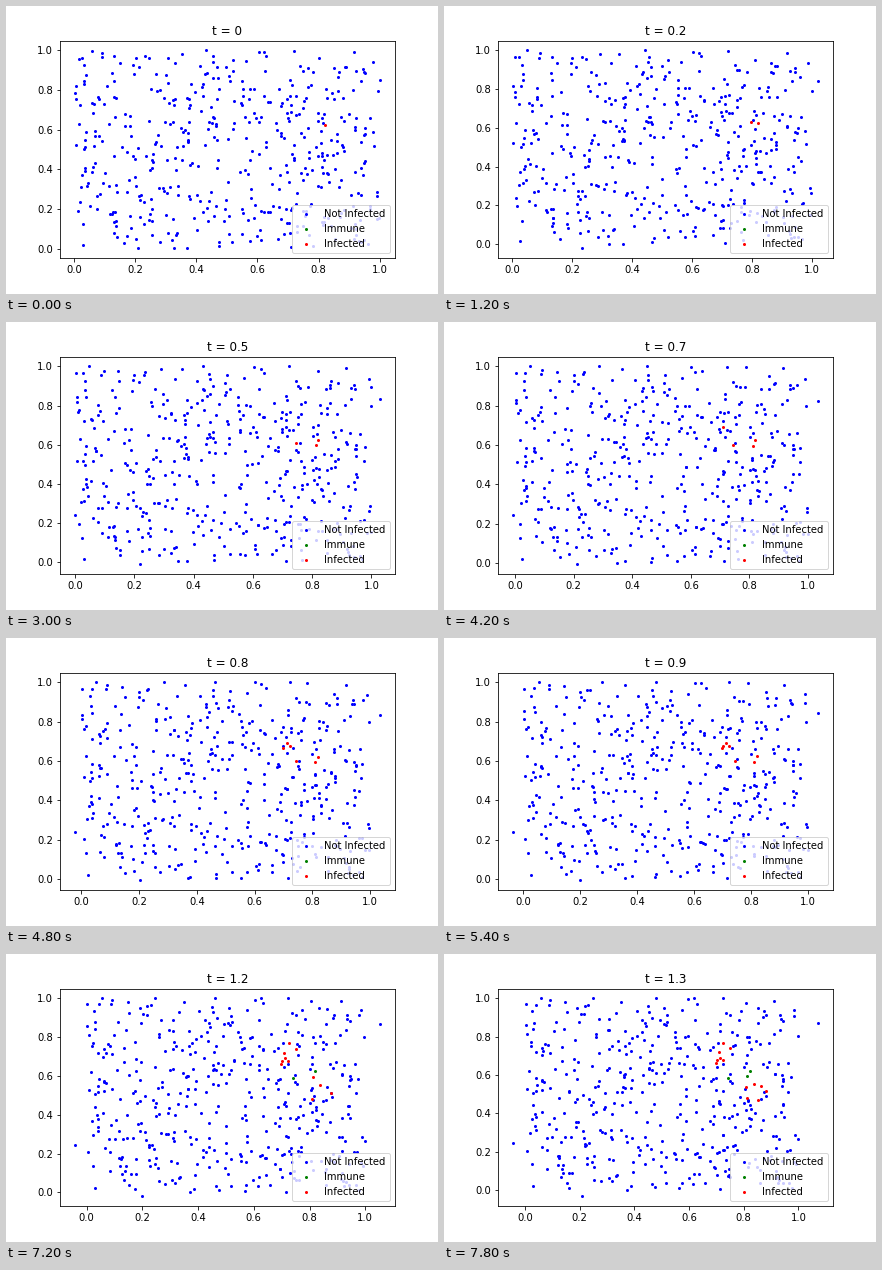
These frames come from a looping animation (432x288 px, 8 s). A matplotlib script:

```python
import numpy as np
import matplotlib.pyplot as plt
from matplotlib.animation import FuncAnimation

STEPS = 14            # simulated times 0.0 .. 1.3
HOLD = 3              # ticks of 200 ms that each step stays on screen
TICKS = 40
PEOPLE = 440
IMMUNE_AFTER = 10
DOT = 4
GOLDEN = np.pi * (3 - 5 ** .5)

rng = np.random.default_rng(7)
times = np.arange(STEPS)


def walk(count, speed):
    """Random walks that start at zero."""
    moves = rng.normal(0, 1, (STEPS, count, 2)) * speed
    moves[0] = 0
    return moves.cumsum(axis=0)


def wander():
    """Blue crowd: most people barely move, a few roam."""
    home = rng.random((PEOPLE, 2))
    roams = rng.random((PEOPLE, 1)) < .12
    return np.clip(home + walk(PEOPLE, np.where(roams, .01, .0025)), .002, 1)


def track(*keys):
    """Path through (step, x, y) keys."""
    k, x, y = zip(*keys)
    return np.column_stack([np.interp(times, k, x), np.interp(times, k, y)])


def outbreak(x, y, spread, count):
    """People spread around a centre by the golden angle."""
    angle = np.pi / 2 + GOLDEN * np.arange(count)
    home = np.column_stack([x + spread * np.cos(angle), y + spread * np.sin(angle)])
    return home + walk(count, .0008)


# People who stray past the edges and so stretch the axes.
strays = np.stack([
    track((1, 1, .85), (2, 1.019, .843), (7, 1.033, .825), (11, 1.033, .86),
          (13, 1.07, .873)),
    track((0, .02, .235), (7, -.007, .243), (9, -.035, .238), (13, -.043, .247)),
    track((0, .21, .003), (2, .234, -.021), (7, .21, -.006), (11, .19, -.007),
          (13, .209, -.031)),
], axis=1)
crowd = np.concatenate([wander(), strays], axis=1)

# Centre, spread and the steps at which people there catch it.
OUTBREAKS = [
    (.82, .605, .018, (0, 3)),
    (.71, .672, .016, (6, 8, 8, 9)),
    (.727, .742, .025, (10, 12, 12)),
    (.84, .51, .04, (11, 12, 12, 13, 13, 13)),
]
roamer = track((0, .815, .632), (2, .796, .628), (5, .744, .608), (13, .742, .587))
cases = np.concatenate(
    [roamer[:, None]] + [outbreak(x, y, r, len(on)) for x, y, r, on in OUTBREAKS],
    axis=1)
onset = np.concatenate([[1]] + [on for *_, on in OUTBREAKS])

plt.rcParams["font.size"] = 10
fig, ax = plt.subplots(figsize=(6, 4), dpi=72)
fig.subplots_adjust(left=.125, right=.9, bottom=.125, top=.88)

healthy = ax.scatter([], [], s=DOT, color="blue", label="Not Infected")
immune = ax.scatter([], [], s=DOT, color="green", label="Immune")
infected = ax.scatter([], [], s=DOT, color="red", label="Infected")
ax.legend(loc="lower right")
title = ax.set_title("t = 0")


def padded(values):
    lo, hi = values.min(), values.max()
    pad = .05 * (hi - lo)
    return lo - pad, hi + pad


def draw(tick):
    step = tick // HOLD
    age = step - onset
    people = cases[step]
    blue = np.vstack([crowd[step], people[age < 0]])
    healthy.set_offsets(blue)
    immune.set_offsets(people[age >= IMMUNE_AFTER])
    infected.set_offsets(people[(age >= 0) & (age < IMMUNE_AFTER)])
    ax.set_xlim(padded(blue[:, 0]))
    ax.set_ylim(padded(blue[:, 1]))
    title.set_text(f"t = {step / 10 if step else 0}")
    return healthy, immune, infected, title


anim = FuncAnimation(fig, draw, frames=TICKS, interval=200, repeat=True,
                     repeat_delay=0, blit=False)
plt.show()
```
